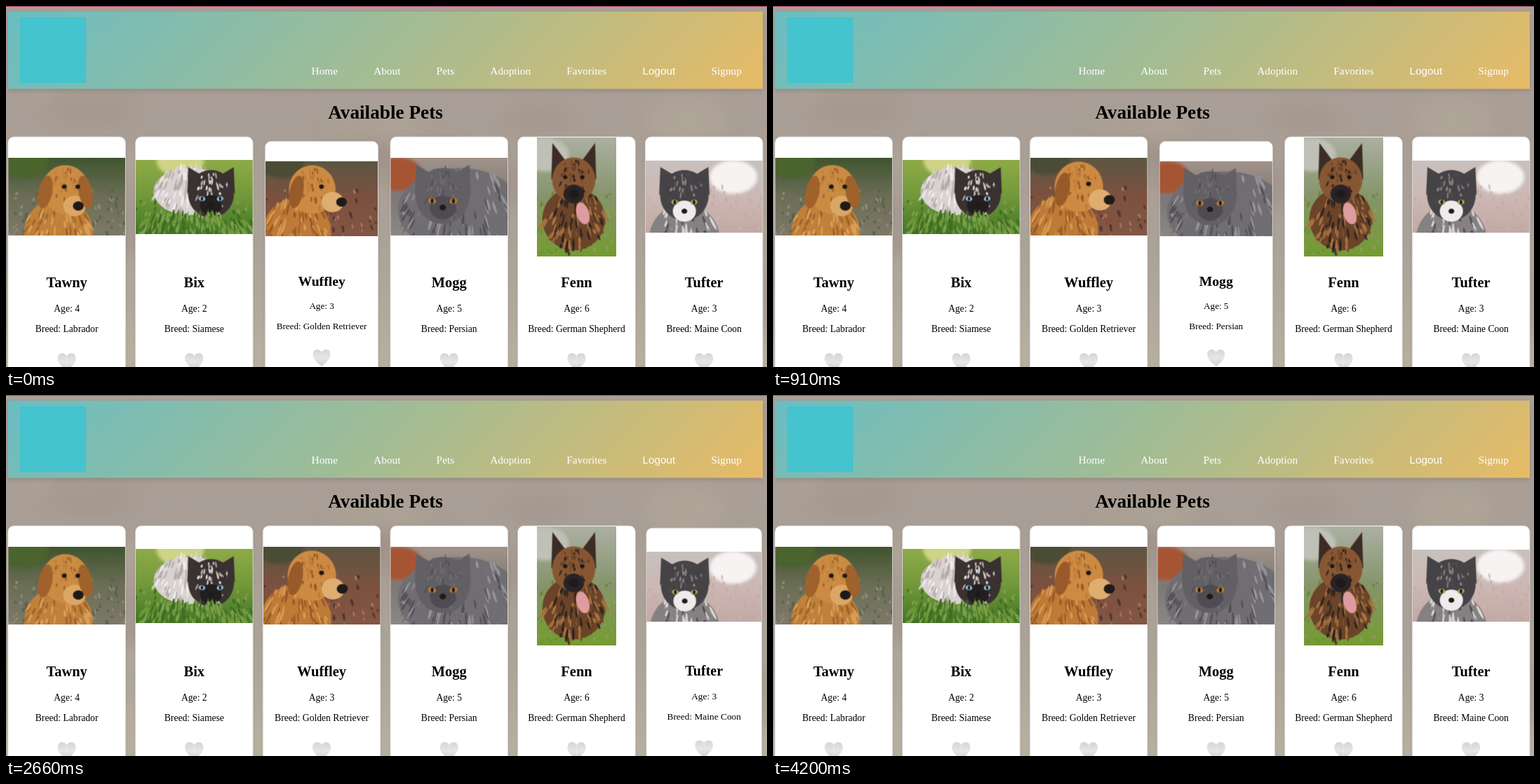
An HTML page with a canvas for the animation above (4.34 s loop, 1085 by 516 pixels).

```html
<!DOCTYPE html>
<html lang="en">
<head>
<meta charset="utf-8">
<title>Available Pets</title>
<style>
  html, body { margin: 0; width: 100%; height: 100%; overflow: hidden; background: #a99e95; }
  canvas { display: block; }
</style>
</head>
<body>
<canvas id="stage" width="1085" height="516"></canvas>
<script>
const W = 1085, H = 516, LOOP = 4340, TICK = 70;
const ZOOM = .852, BODY = 16 * ZOOM, NAV = 18 * ZOOM, NAME = 24 * ZOOM, TITLE = 32 * ZOOM;
const SERIF = '"Liberation Serif", "Times New Roman", serif';
const SANS = '"Liberation Sans", Arial, sans-serif';
const CARD = { x: 2.8, y: 187, w: 167.6, h: 342, pitch: 181.72 };
const PHOTO_Y = 272.5;
const PRESS = { depth: .05, hold: 3 * TICK, duration: 300 };
const ctx = document.getElementById('stage').getContext('2d');

// head: offset from the photo centre and radius; look: where the muzzle points, in head radii.
const pets = [
  { name: 'Tawny', age: 4, breed: 'Labrador', photo: [167, 111],
    ground: ['#40552f', '#6c6e56', '#7d7969'], grain: ['#8f8a7a', '#59614a'], glow: ['#4b632d', -60, -50],
    coat: ['#c0813b', '#d8a05a', '#9f622b'], face: '#ca8b43', muzzle: '#dca765', head: [-2, -10, 35], look: [.46, .58] },
  { name: 'Bix', age: 2, breed: 'Siamese', photo: [167, 106],
    ground: ['#8fab48', '#72983a', '#427627'], grain: ['#7da34c', '#3f6d22'], glow: ['#ced386', -20, -52], grass: true,
    coat: ['#d8d3d2', '#efeceb', '#b6aaa6'], face: '#3a3131', muzzle: '#231e20', eye: '#91c5e1',
    head: [24, -4, 34], look: [0, .41], cat: true, drop: -.1, lean: -.9, girth: 1.5 },
  { name: 'Wuffley', age: 3, breed: 'Golden Retriever', photo: [167, 111],
    ground: ['#5d5642', '#7c5140', '#835746'], grain: ['#a9745b', '#54352a', '#8a4c36'], glow: ['#4b4c36', -60, -55],
    coat: ['#bd7b37', '#d79b52', '#985a29'], face: '#cd8a42', muzzle: '#dfad70', head: [-14, -14, 36], look: [1.05, .45] },
  { name: 'Mogg', age: 5, breed: 'Persian', photo: [167, 111],
    ground: ['#a19389', '#7d7877', '#8d8784'], grain: ['#8f8b8c', '#625f63'], glow: ['#a65534', -72, -32],
    coat: ['#716e73', '#97949a', '#525056'], face: '#626065', muzzle: '#4f4c51', eye: '#bd7c30',
    head: [-9, -1, 40], look: [0, .36], cat: true, drop: .5, lean: .6, girth: 2.2 },
  { name: 'Fenn', age: 6, breed: 'German Shepherd', photo: [113, 170],
    ground: ['#acb0a2', '#86946b', '#749c31'], grain: ['#8b9d58', '#6a8938'], glow: ['#bfc1b7', -45, -60],
    coat: ['#6b4429', '#a97341', '#2d231f'], face: '#875734', muzzle: '#292325', ear: '#3d2c25',
    head: [-4, -24, 32], look: [0, .55], erect: 1.65, tongue: true },
  { name: 'Tufter', age: 3, breed: 'Maine Coon', photo: [167, 102.5],
    ground: ['#c7c1be', '#cdb8b4', '#c3a9a4'], grain: ['#cbb4b0', '#c2aaa6'], glow: ['#f6f3f2', 42, -28],
    coat: ['#858183', '#dad7d4', '#504d50'], face: '#454346', muzzle: '#edebeb', eye: '#a4a866',
    head: [-28, -2, 36], look: [0, .55], cat: true }
];
// Cards are pressed from the third one on.
[-TICK, 840, 1610, 2660].forEach((start, i) => pets[i + 2].press = start);

function seeded(seed) {
  return () => (seed = (seed * 16807) % 2147483647) / 2147483647;
}

function oval(c, color, x, y, rx, ry = rx, turn = 0) {
  c.fillStyle = color;
  c.beginPath();
  c.ellipse(x, y, rx, ry, turn, 0, 7);
  c.fill();
}

function fade(c, x0, y0, x1, y1, colors) {
  const g = c.createLinearGradient(x0, y0, x1, y1);
  colors.forEach((color, i) => g.addColorStop(i / (colors.length - 1), color));
  return g;
}

// Random strands spread over an oval, pointing away from its top.
function strands(c, colors, count, x, y, rx, ry, length, seed) {
  const rnd = seeded(seed);
  for (let i = 0; i < count; i++) {
    const angle = rnd() * 2 * Math.PI, reach = Math.sqrt(rnd());
    const dx = Math.cos(angle) * reach;
    oval(c, colors[i % colors.length], x + dx * rx, y + Math.sin(angle) * reach * ry,
      1 + rnd(), length * (.5 + rnd()), -dx * .6);
  }
}

function drawEar(c, pet, side, r) {
  const color = pet.ear || pet.coat[2];
  if (!pet.cat && !pet.erect) {
    const x = side * .95 * (1 - .3 * pet.look[0]);
    return oval(c, color, x * r, .1 * r, .28 * r, .68 * r, -side * .2);
  }
  c.fillStyle = pet.cat ? pet.face : color;
  c.beginPath();
  c.moveTo(side * .25 * r, -.7 * r);
  c.lineTo(side * .95 * r, -(pet.erect || 1.12) * r);
  c.lineTo(side * r, 0);
  c.fill();
}

function drawEye(c, pet, side, r) {
  const x = (pet.look[0] * .5 + side * .38 * (1 - .6 * pet.look[0])) * r;
  const y = (pet.cat ? pet.look[1] * .5 : -.12) * r;
  if (pet.cat) oval(c, pet.eye, x, y, .14 * r, .1 * r, -side * .2);
  oval(c, '#1d1816', x, y, (pet.cat ? .05 : .1) * r, .09 * r);
}

function drawHead(c, pet) {
  const [x, y, r] = pet.head, [lx, ly] = pet.look;
  const sides = lx > .9 ? [-1] : [-1, 1];
  c.save();
  c.translate(x, y);
  if (pet.cat || pet.erect) sides.forEach(side => drawEar(c, pet, side, r));
  oval(c, pet.face, 0, 0, r * .96, r);
  strands(c, [pet.face, pet.coat[0], pet.coat[2]], 50, 0, 0, r * .8, r * .85, r * .1, 7);
  if (pet.tongue) oval(c, '#dd9da0', r * .4, r * 1.5, r * .28, r * .5, -.3);
  oval(c, pet.muzzle, lx * r * .8, ly * r * 1.15, r * .46, r * .42);
  if (!pet.cat && !pet.erect) sides.forEach(side => drawEar(c, pet, side, r));
  sides.forEach(side => drawEye(c, pet, side, r));
  const nose = pet.cat ? .1 : .19;
  oval(c, '#1f1a1a', lx * r * 1.15, ly * r * 1.15, nose * r * 1.15, nose * r);
  c.restore();
}

function paintPhoto(pet, seed) {
  const [w, h] = pet.photo;
  const canvas = document.createElement('canvas');
  canvas.width = w * 2;
  canvas.height = h * 2;
  const c = canvas.getContext('2d');
  c.scale(2, 2);
  c.translate(w / 2, h / 2);
  c.fillStyle = fade(c, 0, -h / 2, 0, h / 2, pet.ground);
  c.fillRect(-w / 2, -h / 2, w, h);

  c.filter = 'blur(5px)';
  const [glow, gx, gy] = pet.glow;
  oval(c, glow, gx, gy, 34, 24);
  c.filter = 'blur(1.2px)';
  strands(c, pet.grain, 200, 0, h / 2, w * .7, h * .7, 3, seed);

  const [x, y, r] = pet.head;
  const { drop = 1.75, lean = -.6 * pet.look[0], girth = 1.4 } = pet;
  const body = [x + lean * r, y + drop * r, girth * r, Math.min(girth, 1.5) * r];
  if (drop < 0) body[3] = r;
  oval(c, pet.coat[0], ...body);
  strands(c, pet.coat, 150, ...body, r * .2, seed + 1);
  drawHead(c, pet);
  if (pet.grass) {
    strands(c, [...pet.grain, pet.ground[1]], 260, 0, h * .48, w * .6, h * .26, 6, seed + 2);
  }
  return canvas;
}

function write(c, text, x, y, font, color = '#000', align = 'center') {
  c.font = font;
  c.fillStyle = color;
  c.textAlign = align;
  c.fillText(text, x, y);
}

function shadowed(c, blur, dy, alpha, draw) {
  c.save();
  c.shadowColor = `rgba(0,0,0,${alpha})`;
  c.shadowBlur = blur;
  c.shadowOffsetY = dy;
  draw();
  c.restore();
}

function paintBackdrop(c) {
  c.fillStyle = fade(c, 0, 0, 0, H, ['#ab9f97', '#a99e95', '#aba298', '#b7af9f']);
  c.fillRect(0, 0, W, H);
  const rnd = seeded(29);
  c.filter = 'blur(12px)';
  c.globalAlpha = .3;
  for (let i = 0; i < 24; i++) {
    oval(c, i % 2 ? '#bcb29f' : '#978780', rnd() * W, 120 + rnd() * 400, 40 + rnd() * 60, 15 + rnd() * 30);
  }
  c.globalAlpha = 1;
  c.filter = 'none';
  c.fillStyle = '#a63a5e';
  c.fillRect(0, 0, W, 1);
}

function paintHeader(c) {
  const bar = { x: 2.5, y: 8, w: 1076.5, h: 110.5 };
  const cx = bar.x + bar.w / 2, cy = bar.y + bar.h / 2, reach = (bar.w + bar.h) / 4;
  c.fillStyle = fade(c, cx - reach, cy - reach, cx + reach, cy + reach, ['#6abdc2', '#a2bc94', '#e7bb66']);
  shadowed(c, 6, 2, .14, () => c.fillRect(bar.x, bar.y, bar.w, bar.h));
  c.fillStyle = '#45c3ce';
  c.fillRect(20, 16, 94, 94);

  let x = 435.6;
  for (const label of ['Home', 'About', 'Pets', 'Adoption', 'Favorites', 'Logout', 'Signup']) {
    write(c, label, x, 98, `${NAV}px ${label === 'Logout' ? SANS : SERIF}`, '#fff', 'left');
    x += c.measureText(label).width + 60 * ZOOM;
  }
}

function paintPage() {
  const canvas = document.createElement('canvas');
  canvas.width = W;
  canvas.height = H;
  const c = canvas.getContext('2d');
  paintBackdrop(c);
  paintHeader(c);
  write(c, 'Available Pets', W / 2 - 1.5, 161, `bold ${TITLE}px ${SERIF}`);
  return canvas;
}

function drawHeart(c, x, y) {
  c.save();
  c.translate(x, y);
  c.fillStyle = fade(c, 0, 0, 0, 25, ['#d5d5d6', '#e6e6e7', '#cfcfd0']);
  for (const side of [-1, 1]) {
    c.beginPath();
    c.moveTo(0, 4);
    c.bezierCurveTo(side * 3, -2, side * 13, -2, side * 13, 7.5);
    c.bezierCurveTo(side * 13, 15, side * 4, 21, 0, 25);
    c.fill();
  }
  c.restore();
}

// The CSS "ease" curve: cubic-bezier(.25, .1, .25, 1).
function ease(x) {
  if (x <= 0 || x >= 1) return x <= 0 ? 0 : 1;
  const curve = (s, a, b) => 3 * a * s * (1 - s) ** 2 + 3 * b * s * s * (1 - s) + s ** 3;
  let low = 0, high = 1;
  for (let i = 0; i < 20; i++) {
    const s = (low + high) / 2;
    if (curve(s, .25, .25) < x) low = s; else high = s;
  }
  return curve(low, .1, 1);
}

// Shrinks while held; a release part-way runs back in proportionally less time.
function cardScale(start, t) {
  if (start === undefined || t < start) return 1;
  const { depth, hold, duration } = PRESS;
  const age = t - start + TICK;
  const pressed = ease(Math.min(age, hold) / duration);
  const released = ease((age - hold) / (duration * pressed));
  return 1 - depth * pressed * (1 - released);
}

function drawCard(c, pet, scale) {
  const [w, h] = pet.photo, cy = CARD.y + CARD.h / 2;
  c.save();
  c.translate(pet.mid, cy);
  c.scale(scale, scale);
  c.translate(-pet.mid, -cy);
  c.beginPath();
  c.roundRect(pet.mid - CARD.w / 2, CARD.y, CARD.w, CARD.h, 8.5);
  c.fillStyle = '#fff';
  shadowed(c, 4, 1.5, .1, () => c.fill());
  c.drawImage(pet.image, pet.mid - w / 2, PHOTO_Y - h / 2, w, h);
  c.strokeStyle = '#d9d6d4';
  c.lineWidth = ZOOM;
  c.stroke();
  write(c, pet.name, pet.mid, 402, `bold ${NAME}px ${SERIF}`);
  write(c, 'Age: ' + pet.age, pet.mid, 436.5, `${BODY}px ${SERIF}`);
  write(c, 'Breed: ' + pet.breed, pet.mid, 466, `${BODY}px ${SERIF}`);
  drawHeart(c, pet.mid, 496.5);
  c.restore();
}

pets.forEach((pet, i) => {
  pet.mid = CARD.x + i * CARD.pitch + CARD.w / 2;
  pet.image = paintPhoto(pet, 11 + i * 10);
});
const page = paintPage();
let shown = -1;

function frame(now) {
  const t = Math.floor((now % LOOP) / TICK) * TICK;
  if (t !== shown) {
    shown = t;
    ctx.drawImage(page, 0, 0);
    pets.forEach(pet => drawCard(ctx, pet, cardScale(pet.press, t)));
  }
  requestAnimationFrame(frame);
}

frame(0);
</script>
</body>
</html>
```
